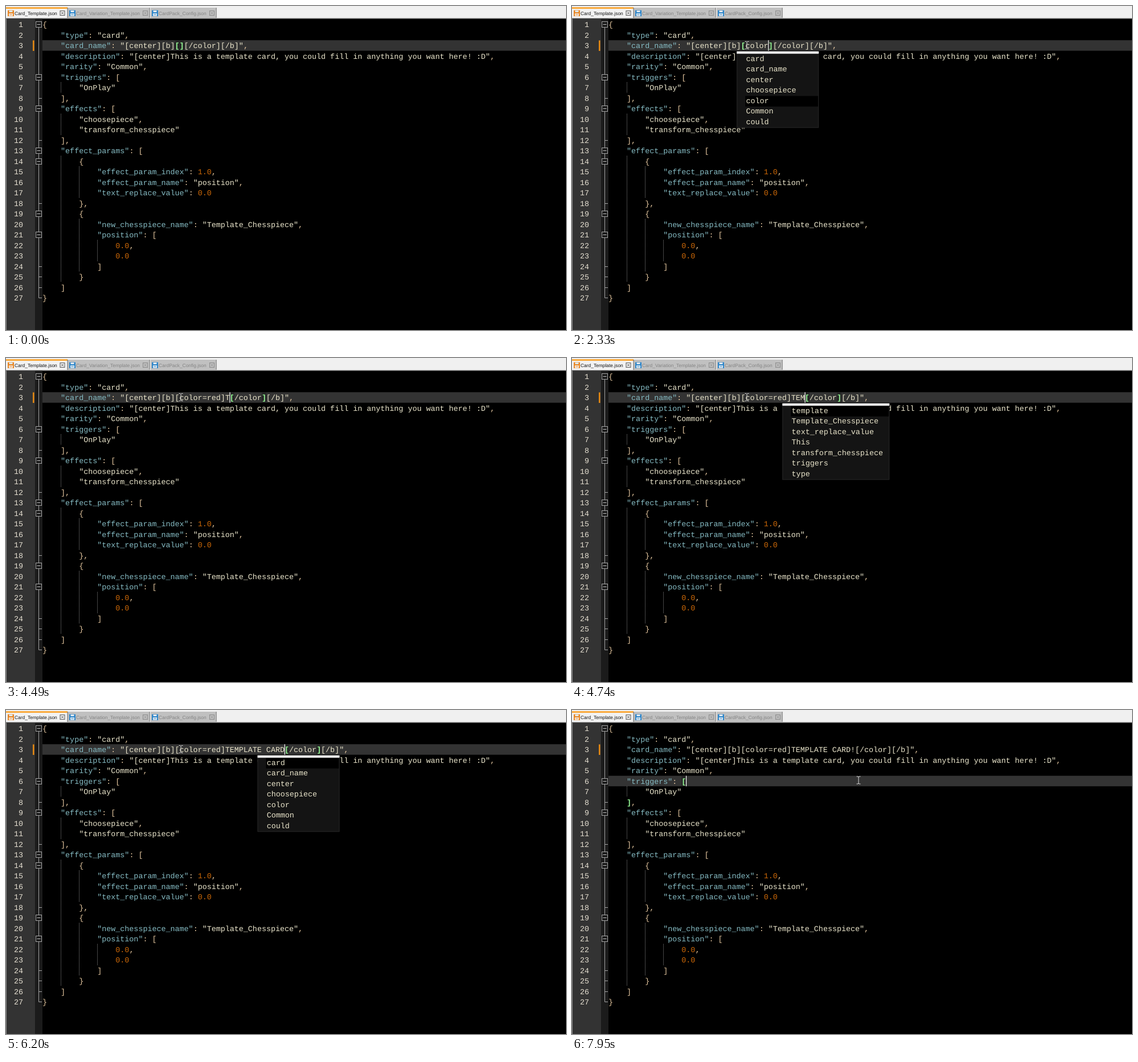
An HTML page for the animation above (8 s loop, 983x570 px).

```html
<!DOCTYPE html>
<html lang="en">
<head>
<meta charset="utf-8">
<title>Editing a card template</title>
<style>
  html, body { margin: 0; width: 100%; height: 100%; overflow: hidden; background: #000; }
  svg { display: block; width: 983px; height: 570px; }
  text { text-rendering: geometricPrecision; white-space: pre; }
  .code { font: 13.364px "Liberation Mono", "Courier New", monospace; }
  .tab { font: 8.42px "Liberation Sans", Arial, sans-serif; }
  .key { fill: #86bcc4; }
  .str { fill: #ebe6cc; }
  .num { fill: #d06a08; }
  .op { fill: #e6c8a0; }
  .no { fill: #e6e0d2; }
  .brace { fill: #99ff99; font-weight: bold; }
</style>
</head>
<body>
<svg id="stage" viewBox="0 0 983 570"></svg>
<script>
const LOOP = 8000, LEFT = 64, CELL = 8.02, TOP = 23.2, ROW = 18.5, BASE = 14;
const stage = document.getElementById("stage");

const lines = [
  '{',
  '    "type": "card",',
  '',
  '    "description": "[center]This is a template card, you could fill in anything you want here! :D",',
  '    "rarity": "Common",',
  '    "triggers": [',
  '        "OnPlay"',
  '    ],',
  '    "effects": [',
  '        "choosepiece",',
  '        "transform_chesspiece"',
  '    ],',
  '    "effect_params": [',
  '        {',
  '            "effect_param_index": 1.0,',
  '            "effect_param_name": "position",',
  '            "text_replace_value": 0.0',
  '        },',
  '        {',
  '            "new_chesspiece_name": "Template_Chesspiece",',
  '            "position": [',
  '                0.0,',
  '                0.0',
  '            ]',
  '        }',
  '    ]',
  '}'
];

// Typing into the card name
const NAME_ROW = 3, CLICK_ROW = 6, CLICK = 7920;
const head = '    "card_name": "[center][b][', tail = '[/color][/b]",';
const typed = "color=red]TEMPLATE CARD!";
const TAG_LEN = 9; // the closing bracket already exists and is typed over
const keyTimes = [
  1660, 1920, 2090, 2250, 2330, 2580, 2850, 2880, 3190, 3520,
  4490, 4570, 4740, 4910, 5010, 5120, 5280, 5360, 5740, 5860, 5950, 6030, 6200, 7200
];
const caretOff = [[0, 290], [820, 1090], [4110, 4490], [6820, 7200], [7800, CLICK]];

const cWords = ["card", "card_name", "center", "choosepiece", "color", "Common", "could"];
const tWords = ["template", "Template_Chesspiece", "text_replace_value", "This",
  "transform_chesspiece", "triggers", "type"];
// from, to, first typed letter, words, selected word
const popups = [
  [1700, 1920, 0, cWords, 0],
  [1920, 2580, 0, cWords, 4],
  [2850, 2880, 6, ["rarity"], 0],
  [4530, 5740, 10, tWords, 0],
  [5900, 7200, 19, cWords, 0]
];

// time, x, y of the pointer
const pointer = [
  [270, 893, 552], [960, 309, 69.5], [1050, 309, 69.5], [1090, 303, 66], [1130, 303, 66],
  [1170, 307, 69], [6910, 307, 69], [6950, 306, 69], [7420, 306, 69], [7840, 503, 123.5]
];

const colX = c => LEFT + c * CELL;
const rowY = n => TOP + (n - 1) * ROW;
const esc = s => s.replace(/&/g, "&amp;").replace(/</g, "&lt;");
const rect = (x, y, w, h, fill, more = "") =>
  `<rect x="${x}" y="${y}" width="${w}" height="${h}" fill="${fill}" ${more}/>`;
const path = (d, stroke, more = "") =>
  `<path d="${d}" fill="none" stroke="${stroke}" ${more}/>`;
const label = (x, y, s, cls, more = "") =>
  `<text x="${x}" y="${y}" class="${cls}" ${more}>${esc(s)}</text>`;

function codeLine(s, n) {
  let out = "";
  for (const m of s.matchAll(/"[^"]*"|[\d.]+|\S/g)) {
    const tok = m[0], next = s[m.index + tok.length];
    const cls = tok[0] === '"' ? (next === ":" ? "key" : "str") : /\d/.test(tok) ? "num" : "op";
    out += label(colX(m.index), rowY(n) + BASE, tok, "code " + cls);
  }
  return out;
}

function floppy(x, color) {
  return rect(x, 7.5, 11, 10.5, color) + rect(x + 2.5, 8, 6, 3, "#dfe8ef") +
    rect(x + 2, 13, 7, 4.5, "#f4f4f4") + rect(x + 3, 14.5, 5, 1, color);
}

function closeBox(x, color) {
  return rect(x + .5, 8.5, 8, 8, "none", `stroke="${color}"`) +
    path(`M${x + 2.5} 10.5l4 4m0 -4l-4 4`, color);
}

function tabBar() {
  const tab = (x, w, name, textX, closeX) =>
    rect(x, 3, w, 18, "#c0c0c0") + rect(x + w - 1, 3, 1.2, 17.5, "#858585") +
    floppy(x + 2, "#2b84c9") + label(textX, 16, name, "tab", 'fill="#838383"') +
    closeBox(closeX, "#8a8a8a");
  return rect(0, 0, 983, 22, "#f0f0f0") +
    tab(109, 143.5, "Card_Variation_Template.json", 123, 240) +
    tab(254, 115.5, "CardPack_Config.json", 268, 357) +
    rect(0, 2, 108, 20, "#f2f2f2") + rect(0, 2, 108, 3, "#faaa3c") +
    rect(107.5, 3, 1.2, 18, "#6a6a6a") + floppy(3, "#e88420") +
    label(15, 16, "Card_Template.json", "tab", 'fill="#111"') + closeBox(94.5, "#555") +
    rect(0, 21, 983, 1.5, "#a0a0a0");
}

function gutter() {
  let out = rect(0, 22.5, 51.5, 548, "#333333") + rect(51.5, 22.5, 12.5, 548, "#1b1b1b") +
    rect(0, 22.5, 1, 548, "#8c8c8c") + rect(47, 60.5, 2.5, 18.5, "#e88a12");
  for (let n = 1; n <= lines.length; n++)
    out += label(30, rowY(n) + BASE, String(n), "code no", 'text-anchor="end"');
  const mid = n => Math.round(rowY(n) + ROW / 2) + .5;
  out += path(`M57.5 ${mid(1)}V${mid(27)}H63`, "#a4a4a4");
  for (const n of [8, 12, 18, 24, 25, 26]) out += path(`M57.5 ${mid(n)}H63`, "#a4a4a4");
  for (const n of [1, 6, 9, 13, 14, 19, 21])
    out += rect(52.5, mid(n) - 5, 10, 10, "#1b1b1b", 'stroke="#a4a4a4"') +
      path(`M54.5 ${mid(n)}H60.5`, "#c4c4c4");
  return out;
}

function guides() {
  const spans = [[4, 7, 7], [4, 10, 11], [4, 14, 25], [8, 15, 17], [8, 20, 24], [12, 22, 23]];
  return spans.map(([c, a, b]) =>
    path(`M${Math.round(colX(c)) + .5} ${rowY(a)}V${rowY(b + 1)}`, "#8a8a8a", 'stroke-dasharray="1 1"')
  ).join("");
}

function nameLine(count) {
  const inside = typed.slice(0, Math.min(count, TAG_LEN));
  return head + inside + "]" + typed.slice(TAG_LEN + 1, Math.max(count, TAG_LEN + 1)) + tail;
}

// Bracket before the caret wins over the one after it
function bracePair(s, caret) {
  const at = "[]".includes(s[caret - 1]) ? caret - 1 : caret;
  return s[at] === "[" ? [at, s.indexOf("]", at)] : [s.lastIndexOf("[", at), at];
}

function brace(ch, col, n, bg) {
  return rect(colX(col), rowY(n), CELL, ROW, bg) + label(colX(col), rowY(n) + BASE, ch, "code brace");
}

function popup(p) {
  if (!p) return "";
  const [, , first, words, chosen] = p;
  const textX = colX(head.length + first), x = textX - 15.5;
  const w = Math.max(144, Math.max(...words.map(s => s.length)) * CELL + 27.5);
  const h = words.length * ROW, y = 84.3;
  let out = rect(x, 79.5, w, h + 5.3, "#141414") + rect(x, 79.8, w, 4.5, "#fff") +
    rect(textX - .5, y + chosen * ROW, w - 16, ROW, "#000") +
    rect(x + .5, y, w - 1, h, "none", 'stroke="#262626"');
  words.forEach((s, i) => { out += label(textX + .8, y + i * ROW + 12.4, s, "code str"); });
  return out;
}

function layer(html = "") {
  const g = document.createElementNS("http://www.w3.org/2000/svg", "g");
  g.innerHTML = html;
  return stage.appendChild(g);
}

layer(rect(0, 0, 983, 570, "#000"));
const highlight = layer();
layer(tabBar() + gutter() + guides() + lines.map((s, i) => codeLine(s, i + 1)).join(""));
const live = layer();
const beam = layer(path("M-3.5 -6.5H-1L0 -5.5L1 -6.5H3.5M0 -5.5V5.5M-3.5 6.5H-1L0 5.5L1 6.5H3.5", "#d8d8d8"));

function drawLive(count, clicked, caretOn, p) {
  const s = nameLine(count);
  const row = clicked ? CLICK_ROW : NAME_ROW;
  const caret = clicked ? lines[row - 1].length : head.length + count;
  let out = codeLine(s, NAME_ROW);
  if (clicked) {
    out += brace("[", caret - 1, row, "#262626") + brace("]", 4, row + 2, "#000");
  } else {
    for (const c of bracePair(s, caret)) out += brace(s[c], c, row, "#262626");
  }
  if (caretOn) out += rect(colX(caret) - .4, rowY(row), 1.2, ROW, "#fff");
  highlight.innerHTML = rect(LEFT, rowY(row), 983 - LEFT, ROW, "#333333");
  live.innerHTML = out + popup(p);
}

function movePointer(t) {
  const i = pointer.findIndex(k => k[0] > t);
  const a = pointer[(i < 0 ? pointer.length : i) - 1];
  beam.style.display = a ? "" : "none";
  if (!a) return;
  const b = i < 0 ? a : pointer[i];
  const u = b === a ? 0 : (t - a[0]) / (b[0] - a[0]);
  const e = u * u * (3 - 2 * u);
  beam.setAttribute("transform", `translate(${a[1] + (b[1] - a[1]) * e} ${a[2] + (b[2] - a[2]) * e})`);
}

let shown = "";
function render(t) {
  const count = keyTimes.filter(k => k <= t).length;
  const within = ([from, to]) => t >= from && t < to;
  const caretOn = !caretOff.some(within), p = popups.find(within), clicked = t >= CLICK;
  const state = [count, clicked, caretOn, popups.indexOf(p)].join();
  if (state !== shown) drawLive(count, clicked, caretOn, p);
  shown = state;
  movePointer(t);
}

const start = performance.now();
function tick() {
  render((performance.now() - start) % LOOP);
  requestAnimationFrame(tick);
}
tick();
</script>
</body>
</html>
```
